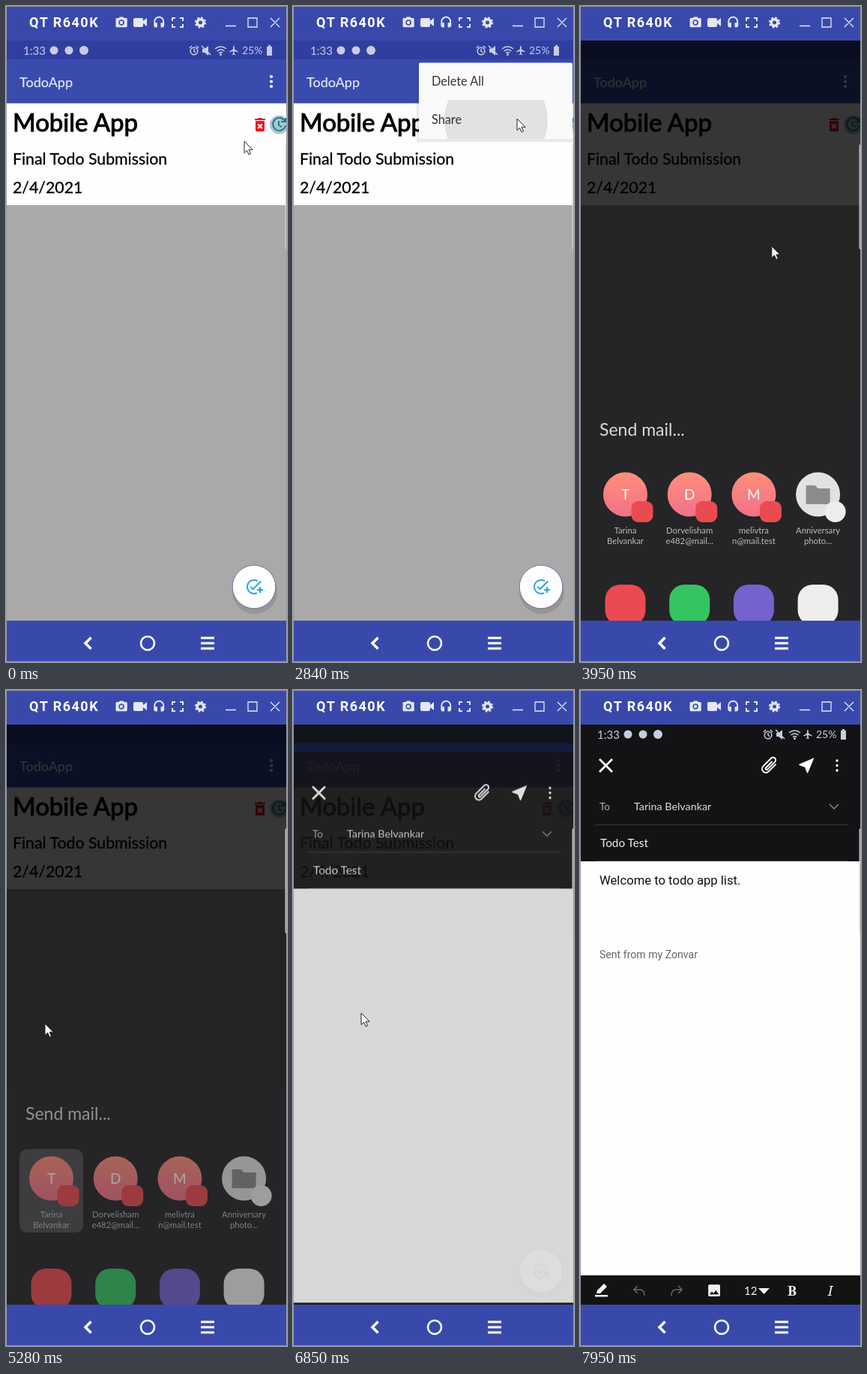
An HTML page that plays this animation: 375x873 px, repeating every 8000 ms.

```html
<!DOCTYPE html>
<html lang="en">
<head>
<meta charset="utf-8">
<title>Todo app: share by mail</title>
<style>
  html, body { margin: 0; width: 100%; height: 100%; overflow: hidden; }
  svg { display: block; width: 375px; height: 873px; }
  text { font-family: Lato, "Open Sans", sans-serif; white-space: pre; }
  .roboto { font-family: Roboto, sans-serif; }
  .serif { font: 18px "Noto Serif", serif; }
  .mid text, text.mid { text-anchor: middle; }
  .line { fill: none; stroke-width: 2; }
</style>
</head>
<body>
<svg id="stage" viewBox="0 0 375 873">
  <defs>
    <linearGradient id="coral" x2="0" y2="1">
      <stop stop-color="#ff8f78"/><stop offset="1" stop-color="#f2718a"/>
    </linearGradient>
    <clipPath id="shareRow"><path d="M168 125h205v52H168z"/></clipPath>
  </defs>

  <g id="app">
    <path fill="#a9a9a9" d="M0 46h375v772H0z"/>
    <path fill="#303f9f" d="M0 46h375v25H0z"/>
    <path fill="#3a4bae" d="M0 71h375v59H0z"/>
    <text x="18" y="108" font-size="18" fill="#e6e8f6" stroke="#e6e8f6" stroke-width=".2">TodoApp</text>
    <g fill="#fff"><circle cx="354" cy="94" r="2.1"/><circle cx="354" cy="100.5" r="2.1"/><circle cx="354" cy="107" r="2.1"/></g>
    <path fill="#fefefe" d="M0 129.500h375V265H0z"/>
    <g stroke="#000" stroke-width=".3">
      <text x="9" y="167" font-size="33" stroke-width="1">Mobile App</text>
      <text x="9" y="211" font-size="21.3">Final Todo Submission</text>
      <text x="9" y="249" font-size="21.3">2/4/2021</text>
    </g>
    <path fill="#f0141e" transform="translate(327 146)" d="M6 19c0 1.1.9 2 2 2h8c1.1 0 2-.9 2-2V7H6v12zm2.46-7.12l1.41-1.41L12 12.59l2.12-2.12 1.41 1.41L13.41 14l2.12 2.12-1.41 1.41L12 15.41l-2.12 2.12-1.41-1.41L10.59 14l-2.13-2.12zM15.5 4l-1-1h-5l-1 1H5v2h14V4z"/>
    <circle cx="364.5" cy="158" r="12.5" fill="#b4c1cd"/>
    <g class="line" stroke="#0a8794"><path d="M372 153a8.5 8.5 0 1 0 1 6M373 149v5h-6M364 153v5.5l4 2.5"/></g>
    <circle cx="332" cy="779" r="30" opacity=".12"/>
    <circle cx="331" cy="773" r="28.8" fill="#fefefe" stroke="#5d5d98" stroke-width=".8"/>
    <path fill="#2ba5e0" transform="translate(319 761)" d="M22 5.18L10.59 16.6l-4.24-4.24 1.41-1.41 2.83 2.83 10-10zM12 20c-4.41 0-8-3.59-8-8s3.59-8 8-8c1.57 0 3.04.46 4.28 1.25l1.45-1.45C16.1 2.67 14.13 2 12 2 6.48 2 2 6.48 2 12s4.48 10 10 10c1.73 0 3.36-.44 4.78-1.22l-1.5-1.5c-1 .46-2.11.72-3.28.72zm7-5h-3v2h3v3h2v-3h3v-2h-3v-3h-2v3z"/>
  </g>

  <g id="popup" fill="#333">
    <path opacity=".1" d="M165 76h210v105H165z"/>
    <rect x="168" y="75.5" width="205" height="101.5" rx="2" fill="#fafafa"/>
    <g clip-path="url(#shareRow)"><circle id="ripple" cx="271" cy="152" fill="#e2e2e2"/></g>
    <text x="185" y="106" font-size="16.3">Delete All</text>
    <text x="185" y="157" font-size="16.3">Share</text>
  </g>

  <path id="scrim" d="M0 46h375v772H0z"/>

  <g id="sheet">
    <path fill="#252427" d="M0 530h375v300H0z"/>
    <g id="sheetItems">
      <rect id="pressed" x="18" y="611" width="85" height="111" rx="10" fill="#4e4e50"/>
      <text x="26" y="572" font-size="23" fill="#dadada">Send mail...</text>
      <g id="targets" class="mid"></g>
    </g>
  </g>

  <g id="compose">
    <path fill="#fefefe" d="M0 130h375v700H0z"/>
    <g id="content">
      <path fill="#131315" d="M0 100h375v128H0z"/>
      <path class="line" stroke="#38383a" style="stroke-width:1" d="M20 179.5h338M20 227.5h338"/>
      <text x="26" y="160" font-size="13.5" fill="#b0b0b0">To</text>
      <text x="72" y="160" font-size="14.3" fill="#ddd">Tarina Belvankar</text>
      <path class="line" stroke="#888" style="stroke-width:1.5" d="M333 152l6 6 6-6"/>
      <text x="27" y="209" font-size="15.3" fill="#eee">Todo Test</text>
      <text id="message" class="roboto" x="26" y="259" font-size="16.67" fill="#111">Welcome to todo app list.</text>
      <path id="caret" d="M26 244h1.5v20H26z"/>
      <text id="footer" class="roboto" x="26" font-size="14.1" fill="#666">Sent from my Zonvar</text>
    </g>
    <path fill="#131315" d="M0 46h375v84H0z"/>
    <g id="loading">
      <path fill="#4c2c28" d="M0 130h375v4H0z"/>
      <rect id="progress" y="130" width="185" height="4" fill="#cb6350"/>
      <rect x="362" y="183" width="4" height="206" rx="2" fill="#666"/>
    </g>
    <g fill="#fff">
      <path class="line" style="stroke-width:2.7" stroke="#fff" d="M26 92l17 17M43 92l-17 17"/>
      <path class="line" stroke="#fff" transform="translate(253 100) rotate(45)" d="M5-7v14a5 5 0 0 1-10 0V-8a3.5 3.5 0 0 1 7 0V6a1.5 1.5 0 0 1-3 0V-6"/>
      <path transform="translate(289 87) scale(1.12)" d="M21 3L3 10.53v.98l6.84 2.65L12.48 21h.98z"/>
      <circle cx="343" cy="94" r="1.7"/><circle cx="343" cy="100.5" r="1.7"/><circle cx="343" cy="107" r="1.7"/>
    </g>
    <g id="keyboard" fill="#f0f0f0">
      <path fill="#131314" d="M0 406h375v40H0z"/>
      <path fill="#252525" d="M0 446h375v51H0z"/>
      <path fill="#080808" d="M0 497h375v330H0z"/>
      <path d="M22 430l1-4 9-9 4 4-9 9zM20 432h17v2.5H20z"/>
      <path class="line" stroke="#666" style="stroke-width:1.5" d="M77 420l-5 5 5 5M72 425h8q6 0 6 8M131 420l5 5-5 5M136 425h-8q-6 0-6 8"/>
      <path transform="translate(168.5 415.5) scale(.88)" d="M21 19V5c0-1.1-.9-2-2-2H5c-1.1 0-2 .9-2 2v14c0 1.1.9 2 2 2h14c1.1 0 2-.9 2-2zM8.5 13.5l2.5 3.01L14.5 12l4.5 6H5z"/>
      <text x="219" y="432" font-size="15">12</text>
      <path d="M238 423h15l-7.5 8z"/>
      <text class="serif mid" x="283" y="433" style="font-weight:700">B</text>
      <text class="serif mid" x="334" y="433" style="font-style:italic">I</text>
      <g id="keys" class="mid"></g>
      <path d="M31 669l9 10h-5v9h-8v-9h-5z"/>
      <path d="M336 679l6-7h15v14h-15z"/>
      <path class="line" stroke="#222" d="M345 676l6 6M351 676l-6 6"/>
      <path d="M333 733l8-7v5h12v-6h4v10h-16v5z"/>
    </g>
  </g>

  <path id="statusShade" fill="#131315" d="M0 46h375v25H0z"/>
  <g id="status" fill="#c8cce2" stroke="#c8cce2" stroke-width="0">
    <text x="23" y="65" font-size="15">1:33</text>
    <circle cx="64" cy="59" r="5.5"/><circle cx="84" cy="59" r="5.5"/><circle cx="104" cy="59" r="6"/>
    <g class="line" style="stroke-width:1.5">
      <circle cx="251" cy="60" r="4.8"/><path d="M251 57v3l2 2M245 56l3-3M257 56l-3-3M261 53l12 12"/>
      <path d="M279 57q7.5-6 15 0M281.5 60q5-4 10 0M284 62.5q2.5-2 5 0"/>
    </g>
    <path d="M262 57h3l5-4v13l-5-4h-3zM348 54h2v-2h3v2h2v12h-7z"/><circle cx="286.5" cy="64.5" r="1.5"/>
    <path transform="translate(297 52) scale(.6)" d="M21 16v-2l-8-5V3.5C13 1.5 10 1.5 10 3.5V9l-8 5v2l8-2.5V19l-2 1.5V22l3.5-1 3.5 1v-1.5L13 19v-5.5z"/>
    <text x="315" y="64" font-size="14">25%</text>
  </g>
  <rect x="372.5" y="184" width="4" height="140" rx="2" fill="#d6d6d6" opacity=".85"/>

  <path id="cursor" fill="#fff" stroke="#222" d="M0 0V15.5l3.6-3.4 2.4 5.6 2.5-1-2.4-5.5h5z"/>

  <g id="frame" fill="#e4e7f7" stroke="#e4e7f7" stroke-width="0">
    <path fill="#3949ab" d="M0 0h375v46H0zM0 818h375v55H0z"/>
    <text class="roboto" x="31" y="28" font-size="18" font-weight="700" letter-spacing="1.5" fill="#fff">QT R640K</text>
    <path transform="translate(145 13) scale(.76)" d="M9 2L7.2 4H4c-1.1 0-2 .9-2 2v12c0 1.1.9 2 2 2h16c1.1 0 2-.9 2-2V6c0-1.1-.9-2-2-2h-3.2L15 2zm3 15a5 5 0 0 1 0-10 5 5 0 0 1 0 10z"/>
    <circle cx="154" cy="22" r="2.2"/>
    <path d="M172 16h9q2 0 2 2v2l5-4v11l-5-4v3q0 2-2 2h-9q-2 0-2-2v-8q0-2 2-2z"/>
    <path transform="translate(195 13) scale(.77)" d="M12 1a9 9 0 0 0-9 9v7a3 3 0 0 0 3 3h3v-8H5.5v-2a6.5 6.5 0 0 1 13 0v2H15v8h3a3 3 0 0 0 3-3v-7a9 9 0 0 0-9-9z"/>
    <g class="line">
      <path d="M222 20v-4h4M232 16h4v4M236 24v4h-4M226 28h-4v-4"/>
      <circle cx="259.5" cy="22" r="4.3" stroke-width="3.6"/>
      <circle cx="259.5" cy="22" r="6.4" stroke-width="2.4" stroke-dasharray="2.513"/>
      <path stroke-width="1.3" d="M293 26.5h14M323 16h12v12h-12zM353 16l12 12M365 16l-12 12"/>
    </g>
    <g class="line" stroke="#fff" style="stroke-width:2.8">
      <path stroke-width="3.5" d="M113.5 840.500l-7.500 7.500 7.500 7.500"/>
      <path d="M260 841h18M260 848h18M260 855h18"/>
      <circle cx="189" cy="848" r="9" stroke-width="2.6"/>
    </g>
    <path class="line" stroke="#9b9ba0" style="stroke-width:1" d="M.5.5h374v872H.5z"/>
  </g>
</svg>

<script>
const $ = id => document.getElementById(id);
const label = (x, y, size, fill, s) => `<text x="${x}" y="${y}" font-size="${size}" fill="${fill}">${s}</text>`;
const box = (x, y, w, h, r, fill) => `<rect x="${x}" y="${y}" width="${w}" height="${h}" rx="${r}" fill="${fill}"/>`;

// Share sheet: contacts above, app tiles below
const people = [['T', 'Tarina', 'Belvankar'], ['D', 'Dorvelisham', 'e482@mail...'],
  ['M', 'melivtra', 'n@mail.test'], ['', 'Anniversary', 'photo...']];
const tiles = ['#ea4b50', '#35c560', '#7562cf', '#eee'];
$('targets').innerHTML = people.map(([initial, top, bottom], i) => {
  const x = 60.5 + i * 85.7;
  const avatar = `<circle cx="${x}" cy="650" r="29.5" fill="${initial ? 'url(#coral)' : '#e2e2e2'}"/>`;
  const inner = initial
    ? label(x, 657, 19, '#fff', initial) + box(x + 8, 659, 29, 28, 9, '#ea4b50')
    : `<path fill="#8c8c8c" d="M${x - 16} 638h12l4 4h16v21h-32z"/><circle cx="${x + 23}" cy="673" r="14" fill="#eee"/>`;
  return avatar + inner + label(x, 702, 11.3, '#bbb', top) + label(x, 716, 11.3, '#bbb', bottom)
    + box(x - 27, 770, 54, 54, 20, tiles[i]);
}).join('');

// Keyboard
const key = (x, y, w, h, s, size = 20) =>
  box(x, y, w, h, 5, w > 30 && w < 60 ? '#262626' : '#363636') + label(x + w / 2, y + h / 2 + size * .36, size, '#f0f0f0', s);
const row = (chars, x, y, h) => [...chars].map((c, i) => key(x + i * 36.5, y, 30, h, c)).join('');
$('keys').innerHTML = row('1234567890', 9, 505, 36) + row('qwertyuiop', 9, 549, 45)
  + row('asdfghjkl', 27.5, 602, 46) + row('zxcvbnm', 64, 656, 45)
  + key(9, 656, 43, 45, '') + key(326, 656, 43, 45, '')
  + key(9, 710, 48, 45, '!#1', 18) + key(64.5, 710, 30, 45, ',') + key(101, 710, 176, 45, 'English (UK)', 12)
  + key(284, 710, 30, 45, '.') + key(321, 710, 48, 45, '');

// Linear interpolation through (step, value) pairs
function track(n, ...k) {
  if (n <= k[0]) return k[1];
  for (let i = 2; i < k.length; i += 2)
    if (n <= k[i]) return k[i - 1] + (k[i + 1] - k[i - 1]) * (n - k[i - 2]) / (k[i] - k[i - 2]);
  return k[k.length - 1];
}
const set = (id, name, value) => $(id).setAttribute(name, value);
const fade = (id, value) => set(id, 'opacity', value);
const move = (id, x, y) => set(id, 'transform', `translate(${x} ${y})`);

const STEP = 137, LOOP = 8000;

function draw(now) {
  const n = Math.floor(now % LOOP / STEP + .5);

  move('cursor', track(n, 1, 318, 7, 349, 13, 349, 17, 306, 19, 299, 25, 299, 28, 298, 34, 45, 38, 45, 39, 52, 44, 52, 48, 91),
    track(n, 1, 180, 7, 98, 13, 98, 17, 128, 19, 150, 25, 150, 28, 246, 34, 688, 38, 688, 39, 444, 44, 444, 48, 430));
  fade('cursor', n < 51 ? 1 : 0);

  const grow = track(n, 9, .6, 11, 1);
  set('popup', 'transform', `translate(373 76) scale(${grow}) translate(-373 -76)`);
  fade('popup', track(n, 9, 0, 11, 1, 21, 1, 24, 0));
  set('ripple', 'r', track(n, 20, 0, 21, 69, 23, 150));

  fade('scrim', track(n, 24, 0, 25, .14, 28, .79, 44, .79, 48, .72, 51, .6));
  fade('sheet', n < 25 ? 0 : track(n, 39, 1, 42, 0));
  move('sheet', 0, track(n, 25, 290, 28, 0));
  fade('sheetItems', track(n, 38, 1, 39, .6, 41, 0));
  fade('pressed', n < 39 ? 0 : 1);

  fade('status', track(n, 26, 1, 28, 0, 50, 0, 51, 1));
  fade('statusShade', track(n, 44, 0, 48, .4, 51, 1));
  fade('compose', track(n, 43, 0, 48, .41, 51, 1));
  move('compose', 0, track(n, 43, 160, 48, 109, 51, 0));

  const loading = n < 55, opened = n > 50;
  move('keyboard', 0, track(n, 51, 373, 53, 0, 55, 0, 57, 300, 58, 373));
  move('content', 0, -track(n, 51, 0, 53, 45, 55, 45, 57, 8, 58, 0));
  fade('message', loading ? 0 : 1);
  fade('caret', loading && opened ? 1 : 0);
  fade('footer', opened ? 1 : 0);
  set('footer', 'y', loading ? 337 : 357);
  fade('loading', loading && opened ? 1 : 0);
  set('progress', 'x', 96 + (n - 53) * 70);
}

(function tick() {
  draw(performance.now());
  requestAnimationFrame(tick);
})();
</script>
</body>
</html>
```
